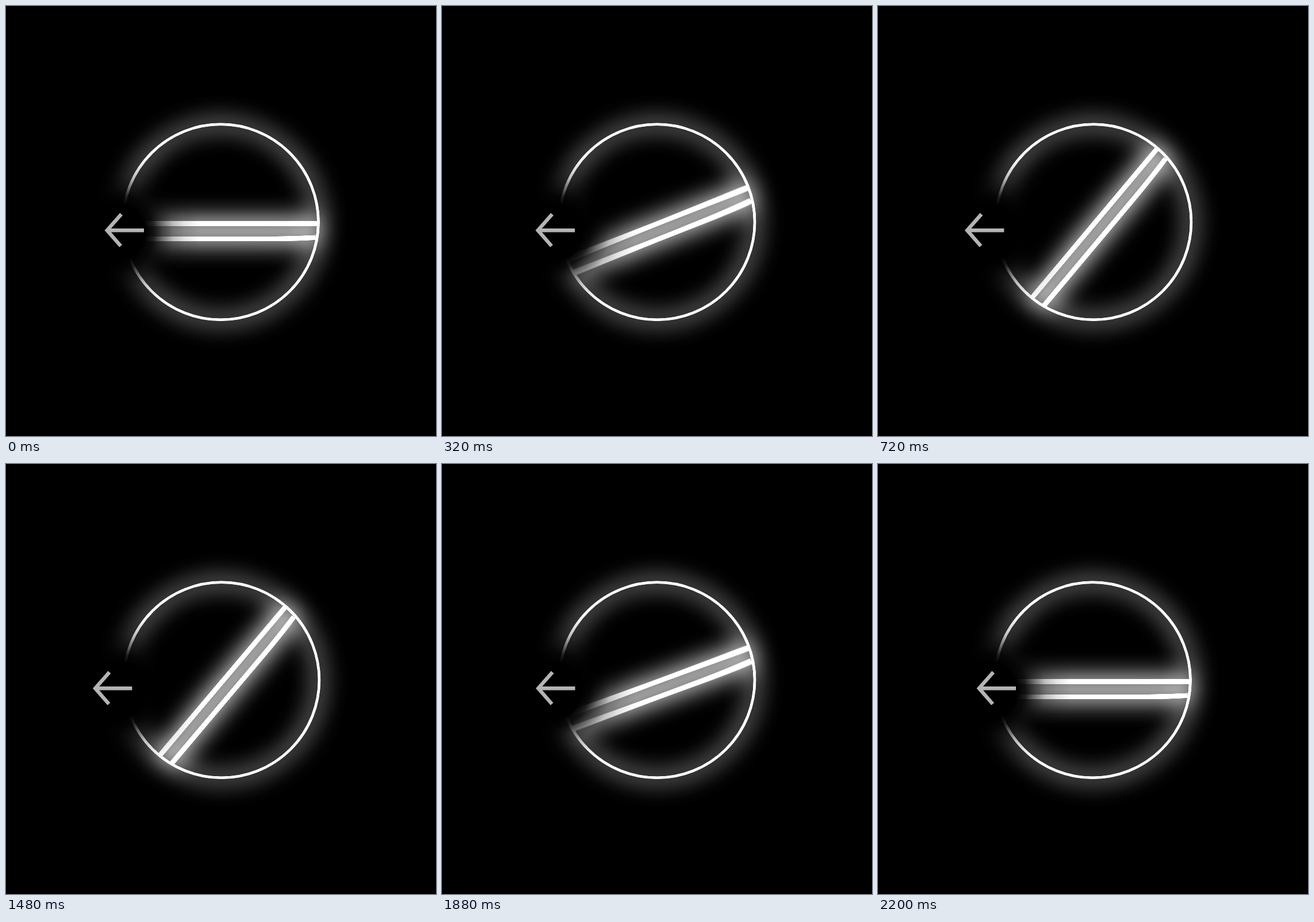
Write an HTML page with a canvas that moves like this. It is 748x748 px and loops after 2.68 s.

```html
<!DOCTYPE html>
<html lang="en">
<head>
<meta charset="utf-8">
<title>Ring and arrow</title>
<style>
  html, body { margin: 0; height: 100%; overflow: hidden; background: #000; }
  canvas { display: block; }
</style>
</head>
<body>
<canvas id="stage" width="748" height="748"></canvas>
<script>
const SIZE = 748, LOOP = 2680, STEP = 40, RADIUS = 170, CY = 375.8;
const ctx = document.getElementById('stage').getContext('2d');
const layer = document.createElement('canvas');
layer.width = layer.height = SIZE;
const ink = layer.getContext('2d');

// Steady speed with a short run-up and run-out
function ease(t) {
  const a = 0.17, k = 2 * a * (1 - a);
  t = Math.min(1, Math.max(0, t));
  if (t < a) return t * t / k;
  if (t > 1 - a) return 1 - (1 - t) ** 2 / k;
  return (t - a / 2) / (1 - a);
}

const progress = t => ease(t / 720) - ease((t - 1455) / 735);

// Dark spot behind the arrow
const shade = ctx.createRadialGradient(192, 394, 0, 192, 394, 145);
[[50, 1], [65, 0.88], [80, 0.58], [100, 0.25], [120, 0.1], [145, 0]].forEach(
  ([r, alpha]) => shade.addColorStop(r / 145, `rgba(0,0,0,${alpha})`));

function drawBars(p, cx) {
  const low = 29.3 - 1.8 * p;
  ink.save();
  ink.translate(cx, CY);
  ink.rotate(-p * 50 * Math.PI / 180);
  ink.beginPath();
  ink.moveTo(-169, 2.7);
  ink.lineTo(168, 2.7);
  ink.moveTo(-169, low);
  ink.lineTo(70, low);
  ink.quadraticCurveTo(125, low, 165, low - 2.4);
  ink.stroke();
  ink.restore();
}

function drawShapes(t, cx) {
  const copies = 8, shutter = 20;
  ink.fillStyle = '#000';
  ink.fillRect(0, 0, SIZE, SIZE);
  ink.strokeStyle = '#fff';
  ink.save();
  ink.beginPath();
  ink.arc(cx, CY, RADIUS, 0, 7);
  ink.clip();
  // Motion blur: average the bars over the shutter time
  ink.globalCompositeOperation = 'lighter';
  ink.globalAlpha = 1 / copies;
  ink.lineWidth = 8;
  for (let i = 0; i < copies; i++)
    drawBars(progress(t + ((i + 0.5) / copies - 0.5) * shutter), cx);
  ink.restore();
  ink.lineWidth = 4.5;
  ink.beginPath();
  ink.arc(cx, CY, RADIUS, 0, 7);
  ink.stroke();
}

function drawArrow(x) {
  ctx.save();
  ctx.translate(x, 390.2);
  ctx.strokeStyle = '#b4b4b4';
  ctx.lineWidth = 6.4;
  ctx.beginPath();
  ctx.moveTo(29, -28);
  ctx.lineTo(4.2, 0);
  ctx.lineTo(28, 27.3);
  ctx.moveTo(5, 0);
  ctx.lineTo(68.4, 0);
  ctx.stroke();
  ctx.restore();
}

function draw(t) {
  const p = progress(t);
  drawShapes(t, 373.4 + 1.5 * p);
  ctx.fillStyle = '#000';
  ctx.fillRect(0, 0, SIZE, SIZE);
  ctx.globalCompositeOperation = 'lighter';
  ctx.filter = 'blur(20px) brightness(2.3)';
  ctx.drawImage(layer, 0, 0);
  ctx.filter = 'none';
  ctx.drawImage(layer, 0, 0);
  ctx.globalCompositeOperation = 'source-over';
  ctx.fillStyle = shade;
  ctx.fillRect(0, 0, SIZE, SIZE);
  drawArrow(171.6 - 20.7 * p);
}

let start, last;
function frame(now) {
  start ??= now;
  const t = Math.floor((now - start) % LOOP / STEP) * STEP;
  if (t !== last) draw(last = t);
  requestAnimationFrame(frame);
}
requestAnimationFrame(frame);
</script>
</body>
</html>
```
